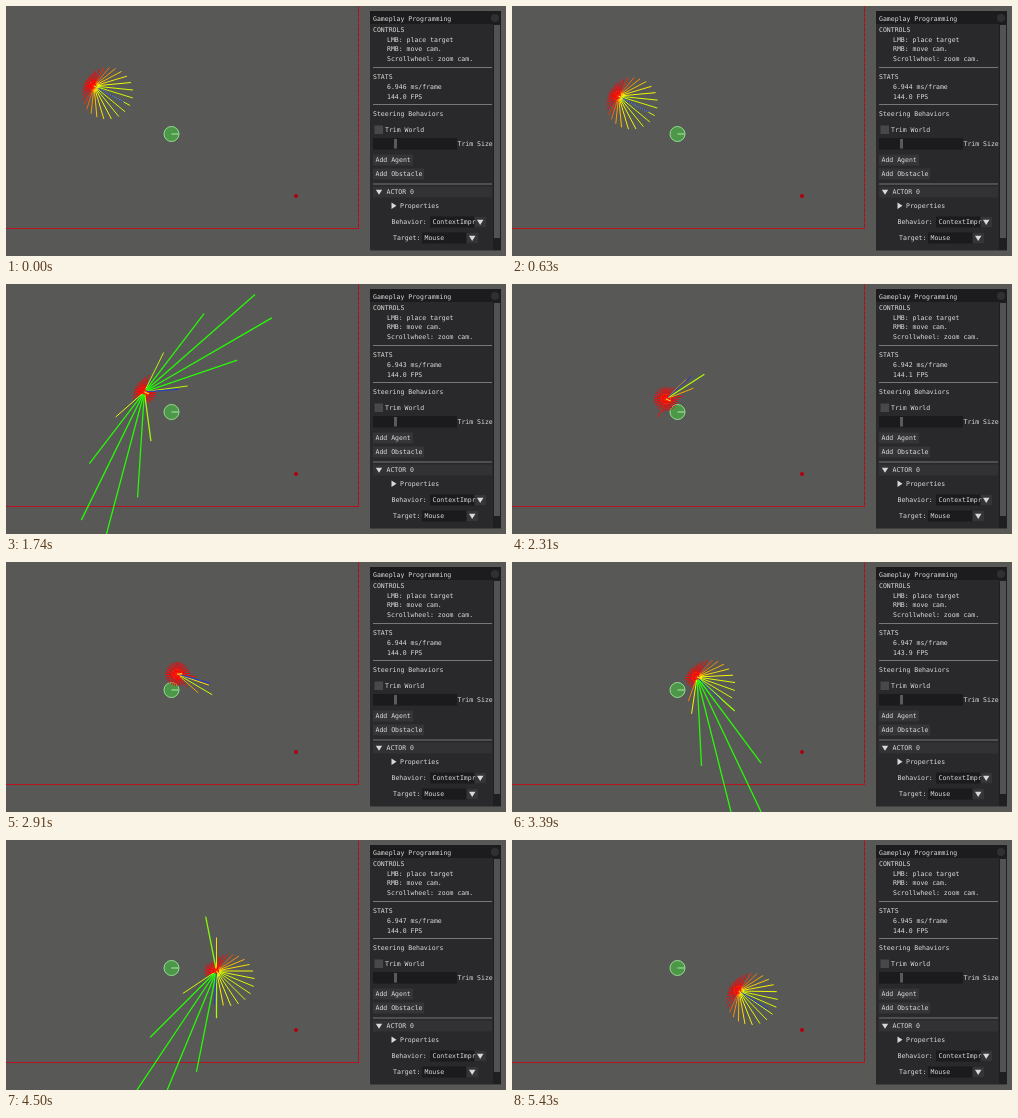
Recreate the animation shown at these times as an HTML page with a canvas. Size 500 by 250 pixels, loop 5460 ms.

```html
<!DOCTYPE html>
<html lang="en">
<head>
<meta charset="utf-8">
<title>Steering demo</title>
<style>
html, body { margin: 0; width: 500px; height: 250px; overflow: hidden; background: #585856; }
canvas, svg { position: absolute; left: 0; top: 0; display: block; }
text { font: 6.5px "DejaVu Sans Mono", "Liberation Mono", monospace; fill: #dcdcdc; white-space: pre; }
</style>
</head>
<body>
<canvas id="stage" width="500" height="250"></canvas>
<svg id="panel" width="500" height="250" viewBox="0 0 500 250"></svg>
<script>
const LOOP = 5460, STEP = 30, RAYS = 32;
const GOAL = { x: 290, y: 190 };
const OBSTACLE = { x: 165.5, y: 128, r: 7.5 };
const SENSE = 46.2;
const rad = Math.PI / 180;

// time, x, y, heading, steering angle, frame cost
const KEYS = [
  [0, 88, 80, 28.4, 28.6, 6.946],
  [1260, 125, 100, 28.4, 28, 6.943],
  [2310, 154, 115, 23.5, -42, 6.942],
  [2850, 169.5, 112, -6, 12, 6.944],
  [3390, 185, 115, 19.6, 44, 6.9474],
  [3930, 200, 120, 33.75, 67, 6.945],
  [4500, 210.5, 131, 56.25, 94, 6.9466],
  [4700, 214, 135.5, 52, 37, 6.946],
  [5430, 227, 151, 46, 32, 6.945]
];

const clamp = (v, a = 0, b = 1) => Math.min(b, Math.max(a, v));
const mix = (a, b, k) => a + (b - a) * k;
const gap = (a, b) => Math.abs(((a - b) % 360 + 540) % 360 - 180);
const bearing = (a, b) => Math.atan2(b.y - a.y, b.x - a.x) / rad;

function slope(i, c) {
  const a = KEYS[Math.max(0, i - 1)], b = KEYS[Math.min(KEYS.length - 1, i + 1)];
  return (b[c] - a[c]) / (b[0] - a[0]);
}

function poseAt(t) {
  let i = 0;
  while (i < KEYS.length - 2 && t >= KEYS[i + 1][0]) i++;
  const a = KEYS[i], b = KEYS[i + 1], d = b[0] - a[0], u = clamp((t - a[0]) / d);
  const curve = c => {
    const u2 = u * u, u3 = u2 * u;
    return (2 * u3 - 3 * u2 + 1) * a[c] + (u3 - 2 * u2 + u) * d * slope(i, c)
      + (3 * u2 - 2 * u3) * b[c] + (u3 - u2) * d * slope(i + 1, c);
  };
  const line = c => mix(a[c], b[c], u);
  return { x: curve(1), y: curve(2), heading: line(3), steer: line(4), ms: line(5) };
}

// Interest pulls towards the goal; a near obstacle pushes out along its two flanks.
function rayLength(angle, goal, block, dist) {
  const off = gap(angle, goal);
  const base = 10 + 31 * Math.pow((1 + Math.cos(off * rad)) / 2, 1.5);
  if (dist > SENSE) return base;
  const side = gap(angle, block);
  const flank = Math.exp(-Math.pow((side - 90 + 0.52 * dist) / 25, 2));
  const weight = off < 115 ? 1
    : Math.min(0.4, clamp((150 - off) / 30)) * clamp((dist - 35) / 8);
  const push = 155 * clamp((dist - 15) / 8) * flank * weight;
  const open = side < 36 ? 12 : Math.max(base, push);
  const close = clamp((22 - dist) / 4);
  const keep = off < 85 ? Math.pow(flank, 2) : 0;
  return mix(open, 12, close * (1 - keep));
}

function rayColor(len) {
  const hue = len < 41 ? 72 * Math.pow(clamp((len - 20) / 21), 0.7)
    : Math.min(112, 72 + (len - 41) * 1.2);
  return `hsl(${hue} 95% 50%)`;
}

const ctx = document.getElementById("stage").getContext("2d");

function stroke(x1, y1, x2, y2, color, width = 1) {
  ctx.strokeStyle = color;
  ctx.lineWidth = width;
  ctx.beginPath();
  ctx.moveTo(x1, y1);
  ctx.lineTo(x2, y2);
  ctx.stroke();
}

function ray(p, angle, len, color, width) {
  stroke(p.x, p.y, p.x + len * Math.cos(angle * rad), p.y + len * Math.sin(angle * rad), color, width);
}

function disc(x, y, r, fill, line) {
  ctx.beginPath();
  ctx.arc(x, y, r, 0, 2 * Math.PI);
  ctx.fillStyle = fill;
  ctx.fill();
  if (line) {
    ctx.strokeStyle = line;
    ctx.lineWidth = 1;
    ctx.stroke();
  }
}

function drawWorld() {
  ctx.fillStyle = "#585856";
  ctx.fillRect(0, 0, 500, 250);
  stroke(0, 222.5, 353, 222.5, "#b5141c");
  stroke(352.5, 0, 352.5, 222, "#8f1a20");
  ctx.setLineDash([3, 2]);
  stroke(352.5, 0, 352.5, 222, "#c0141c");
  ctx.setLineDash([]);
  disc(GOAL.x, GOAL.y, 2, "#b00010");
  disc(OBSTACLE.x, OBSTACLE.y, OBSTACLE.r, "#4c9848", "#93dd90");
  stroke(OBSTACLE.x, OBSTACLE.y, OBSTACLE.x + 7, OBSTACLE.y, "#a8eba6");
}

function drawAgent(p) {
  const goal = bearing(p, GOAL), block = bearing(p, OBSTACLE);
  const dist = Math.hypot(p.x - OBSTACLE.x, p.y - OBSTACLE.y);
  disc(p.x, p.y, 4.6, "#d01c10", "#e8c818");
  for (let i = 0; i < RAYS; i++) {
    const angle = p.heading + i * 360 / RAYS;
    const len = rayLength(angle, goal, block, dist);
    ray(p, angle, len, rayColor(len), len > 45 ? 1.3 : 1);
  }
  ray(p, p.steer, 34, "#2038d8", 1);
  disc(p.x, p.y, 2.6, "#f02010");
  ray(p, p.heading, 5, "#f0e020", 1.2);
}

const panel = document.getElementById("panel");

function add(tag, attrs, text) {
  const el = document.createElementNS("http://www.w3.org/2000/svg", tag);
  for (const k in attrs) el.setAttribute(k, attrs[k]);
  if (text) el.textContent = text;
  panel.appendChild(el);
  return el;
}
const box = (x, y, width, height, fill) => add("rect", { x, y, width, height, fill });
const label = (x, mid, text) => add("text", { x, y: mid + 2.4 }, text);
const rule = y => box(367, y, 119, 1, "#77777a");
const tri = points => add("polygon", { points, fill: "#d8d8d8" });

function combo(x, mid, text) {
  box(x, mid - 5.5, 56, 11, "#1b1b1d");
  box(x + 44.5, mid - 5.5, 11.5, 11, "#353538");
  label(x + 2.5, mid, text);
  tri(`${x + 47},${mid - 2.2} ${x + 53.5},${mid - 2.2} ${x + 50.2},${mid + 3}`);
}

box(364, 5, 131, 239.5, "#29292b");
box(364, 5, 131, 13, "#1c1c1e");
add("circle", { cx: 489, cy: 12, r: 4, fill: "#303033" });
box(487, 18, 8, 226, "#1f1f21");
box(488, 19, 6, 213, "#525254");
label(367, 12.3, "Gameplay Programming");
label(367, 24, "CONTROLS");
label(381, 33.5, "LMB: place target");
label(381, 43, "RMB: move cam.");
label(381, 52.3, "Scrollwheel: zoom cam.");
rule(61);
label(367, 71, "STATS");
const cost = label(381, 81, "6.946 ms/frame");
const rate = label(381, 90.5, "144.0 FPS");
rule(98);
label(367, 108, "Steering Behaviors");
box(368.5, 119.5, 8.5, 8.5, "#48484b");
label(379, 124, "Trim World");
box(367, 132, 84, 11.5, "#1b1b1d");
box(388, 133, 3, 9.5, "#5a5a5d");
label(451.5, 138, "Trim Size");
box(367, 148.5, 40, 11, "#353538");
label(369.5, 154, "Add Agent");
box(367, 162.5, 51, 11, "#353538");
label(369.5, 168, "Add Obstacle");
rule(177.5);
box(367, 180.5, 119, 11, "#323235");
tri("369.8,183.8 376.2,183.8 373,188.8");
label(380.5, 186, "ACTOR 0");
tri("385.5,196.5 385.5,203 390.5,199.8");
label(394, 199.8, "Properties");
label(385.5, 216, "Behavior:");
combo(424, 216, "ContextImpr");
label(387, 232, "Target:");
combo(416, 232, "Mouse");

function frame(now) {
  const t = Math.floor((now % LOOP) / STEP) * STEP;
  const p = poseAt(t);
  drawWorld();
  drawAgent(p);
  cost.textContent = p.ms.toFixed(3) + " ms/frame";
  rate.textContent = (1000 / p.ms).toFixed(1) + " FPS";
}

const start = performance.now();
function tick() {
  frame(performance.now() - start);
  requestAnimationFrame(tick);
}
tick();
</script>
</body>
</html>
```
